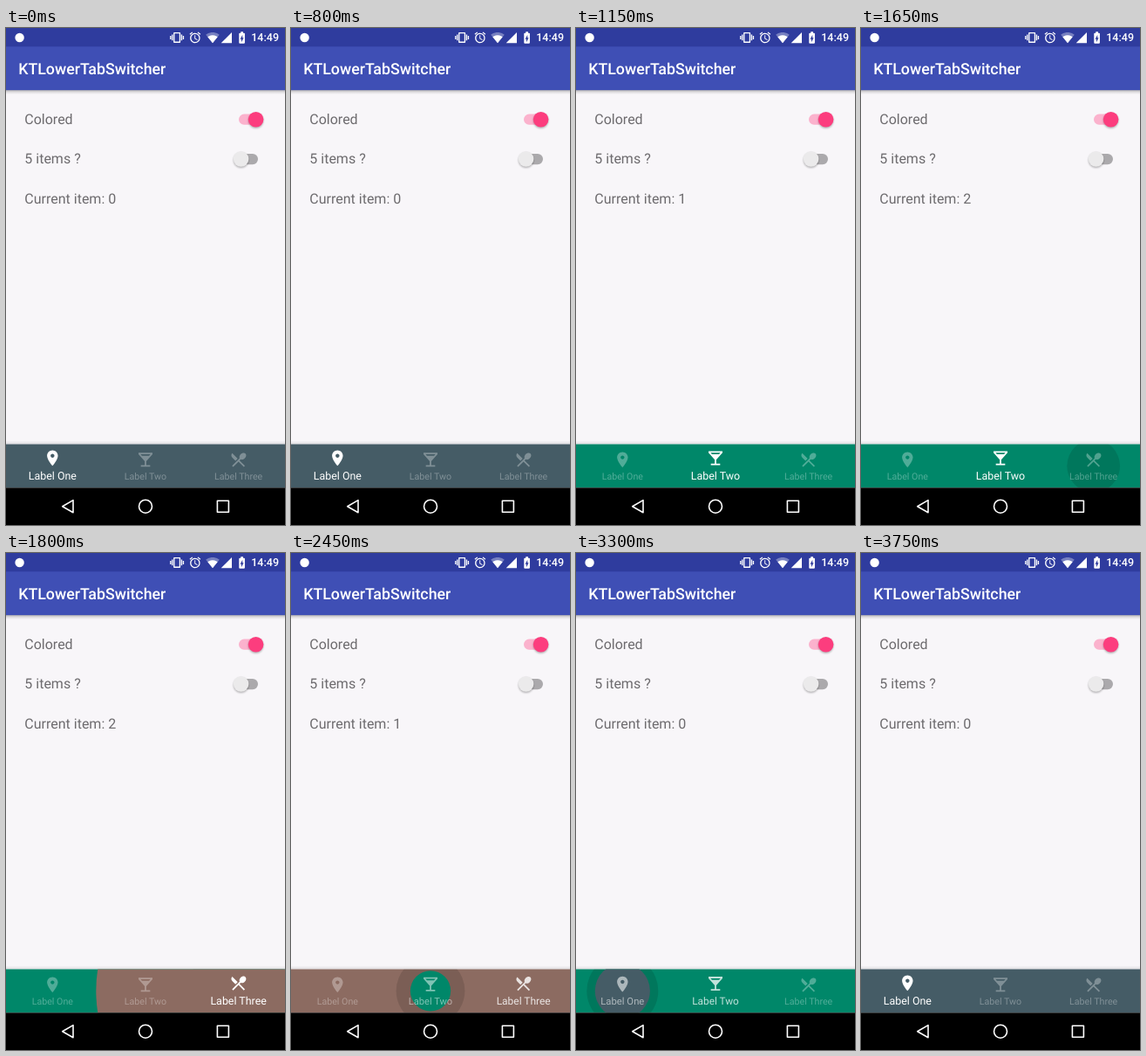
Animation, 320 px wide and 569 px high, one loop 3.9 s. Source, as an HTML page:

```html
<!DOCTYPE html>
<html lang="en">
<head>
<meta charset="utf-8">
<title>Bottom navigation</title>
<style>
  html, body { margin: 0; width: 100%; height: 100%; overflow: hidden; background: #000; }
  svg { display: block; width: 100%; height: 100%; }
  text { font-family: Roboto, "Open Sans", sans-serif; text-rendering: geometricPrecision; }
  .body { font-size: 16px; fill: #6d6b6e; }
</style>
</head>
<body>
<svg viewBox="0 0 320 569">
  <defs>
    <linearGradient id="drop" x2="0" y2="1">
      <stop offset="0" stop-color="#000" stop-opacity=".32"/>
      <stop offset=".4" stop-color="#000" stop-opacity=".12"/>
      <stop offset="1" stop-color="#000" stop-opacity="0"/>
    </linearGradient>
    <linearGradient id="rise" x2="0" y2="1">
      <stop offset="0" stop-color="#000" stop-opacity="0"/>
      <stop offset="1" stop-color="#000" stop-opacity=".1"/>
    </linearGradient>
    <filter id="soft" x="-50%" y="-50%" width="200%" height="200%">
      <feGaussianBlur stdDeviation="1"/>
    </filter>
    <clipPath id="barClip"><rect y="476.4" width="320" height="49.9"/></clipPath>
  </defs>

  <rect width="320" height="569" fill="#f8f6f9"/>

  <!-- Header -->
  <rect y="71" width="320" height="5" fill="url(#drop)"/>
  <rect width="320" height="71.1" fill="#3f4fb5"/>
  <rect width="320" height="21.3" fill="#2f3c9e"/>
  <text x="14.2" y="53.2" font-size="17.8" font-weight="500" fill="#fff">KTLowerTabSwitcher</text>

  <!-- Status icons -->
  <g fill="#fff">
    <circle cx="15.6" cy="11" r="5.2"/>
    <path transform="translate(188.1 2.9) scale(.667)" fill-rule="evenodd" d="M0 15h2V9H0v6zm3 2h2V7H3v10zm19-8v6h2V9h-2zm-3 8h2V7h-2v10zM16.5 3h-9C6.67 3 6 3.67 6 4.5v15c0 .83.67 1.5 1.5 1.5h9c.83 0 1.5-.67 1.5-1.5v-15c0-.83-.67-1.5-1.5-1.5zM16 19H8V5h8v14z"/>
    <path transform="translate(209.2 3.2) scale(.64)" d="M22 5.72l-4.6-3.86-1.29 1.53 4.6 3.86L22 5.72zM7.88 3.39L6.6 1.86 2 5.71l1.29 1.53 4.59-3.85zM12.5 8H11v6l4.75 2.85.75-1.23-4-2.37V8zM12 4c-4.97 0-9 4.03-9 9s4.02 9 9 9a9 9 0 0 0 0-18zm0 16c-3.87 0-7-3.13-7-7s3.13-7 7-7 7 3.13 7 7-3.13 7-7 7z"/>
    <g transform="translate(229 3) scale(.667)">
      <path opacity=".35" d="M12 21.5L23.64 7c-.45-.34-4.93-4-11.64-4S.81 6.66.36 7z"/>
      <path d="M12 21.5l8.47-10.55C20.04 10.62 16.81 8 12 8s-8.04 2.62-8.47 2.95z"/>
    </g>
    <path d="M246.7 17.2h12.3V4.9z"/>
    <path transform="translate(262.6 3) scale(.667)" d="M15.67 4H14V2h-4v2H8.33C7.6 4 7 4.6 7 5.33v15.33C7 21.4 7.6 22 8.33 22h7.33c.74 0 1.34-.6 1.34-1.33V5.33C17 4.6 16.4 4 15.67 4zM11 20v-5.5H9L13 7v5.5h2L11 20z"/>
    <text x="313" y="15.4" font-size="12.5" font-weight="500" text-anchor="end">14:49</text>
  </g>

  <!-- Settings -->
  <text class="body" x="21.3" y="109.8">Colored</text>
  <text class="body" x="21.3" y="155.2">5 items ?</text>
  <text class="body" x="21.3" y="200.5" id="current">Current item: 0</text>

  <rect x="267" y="98.6" width="24" height="12.2" rx="6.1" fill="#fbb2cd"/>
  <circle cx="286.6" cy="106" r="8.7" opacity=".3" filter="url(#soft)"/>
  <circle cx="286.6" cy="104.7" r="8.8" fill="#fc3d7e"/>
  <rect x="265" y="144" width="24" height="12.2" rx="6.1" fill="#aba9ac"/>
  <circle cx="269.6" cy="151.3" r="8.7" opacity=".3" filter="url(#soft)"/>
  <circle cx="269.6" cy="150" r="8.8" fill="#ebeaeb"/>

  <!-- Tab bar -->
  <rect y="472.4" width="320" height="4" fill="url(#rise)"/>
  <g clip-path="url(#barClip)">
    <rect id="base" y="476" width="320" height="51"/>
    <circle id="ripple" cy="501.3" opacity=".12"/>
    <circle id="reveal" cy="501.3"/>
  </g>
  <g id="tabs" fill="#fff" text-anchor="middle"></g>

  <!-- System keys -->
  <rect y="526.3" width="320" height="42.7"/>
  <g fill="none" stroke="#fff" stroke-width="1.6" stroke-linejoin="round">
    <path d="M77 540.6v14.2l-12.3-7.1z"/>
    <circle cx="160" cy="547.7" r="7.5"/>
    <rect x="242.4" y="541.2" width="13" height="13"/>
  </g>
</svg>

<script>
const LOOP = 3900, REVEAL = 300, MORPH = 150;
const OFF_ALPHA = 0x50 / 255;

const tabs = [
  { label: 'Label One', color: '#455c66', icon: 'M12 2C8.13 2 5 5.13 5 9c0 5.25 7 13 7 13s7-7.75 7-13c0-3.87-3.13-7-7-7zm0 9.5c-1.38 0-2.5-1.12-2.5-2.5s1.12-2.5 2.5-2.5 2.5 1.12 2.5 2.5-1.12 2.5-2.5 2.5z' },
  { label: 'Label Two', color: '#008769', icon: 'M21 5V3H3v2l8 9v5H6v2h12v-2h-5v-5l8-9zM7.43 7L5.66 5h12.69l-1.78 2H7.43z' },
  { label: 'Label Three', color: '#8c6b61', icon: 'M8.1 13.34l2.83-2.83L3.91 3.5c-1.56 1.56-1.56 4.09 0 5.66l4.19 4.18zm6.78-1.81c1.53.71 3.68.21 5.27-1.38 1.91-1.91 2.28-4.65.81-6.12-1.46-1.46-4.2-1.1-6.12.81-1.59 1.59-2.09 3.74-1.38 5.27L3.7 19.87l1.41 1.41L12 14.41l6.88 6.88 1.41-1.41L13.41 13l1.47-1.47z' }
];

// Taps: time in ms, tab chosen
const taps = [[-1000, 0], [840, 1], [1649, 2], [2399, 1], [3240, 0]];

const byId = id => document.getElementById(id);
const set = (el, attrs) => { for (const k in attrs) el.setAttribute(k, attrs[k]); };
const add = (parent, name) =>
  parent.appendChild(document.createElementNS('http://www.w3.org/2000/svg', name));
const mix = (a, b, p) => a + (b - a) * p;
const ease = p => (1 - Math.cos(Math.PI * Math.min(1, Math.max(0, p)))) / 2;
const centre = i => 320 * (i + .5) / 3;

const current = byId('current'), base = byId('base');
const ripple = byId('ripple'), reveal = byId('reveal');

tabs.forEach((tab, i) => {
  tab.g = add(byId('tabs'), 'g');
  tab.path = add(tab.g, 'path');
  tab.text = add(tab.g, 'text');
  set(tab.path, { d: tab.icon });
  set(tab.text, { x: centre(i) });
  tab.text.textContent = tab.label;
});

function poseTab(tab, i, on) {
  set(tab.g, { opacity: mix(OFF_ALPHA, 1, on) });
  set(tab.path, { transform: `translate(${centre(i) - 10.67} ${mix(483.6, 481.8, on)}) scale(.889)` });
  set(tab.text, { y: mix(517, 516.6, on), 'font-size': mix(10.67, 12.44, on) });
}

function draw(t) {
  let n = taps.length - 1;
  while (taps[n][0] > t) n--;
  const [start, now] = taps[n];
  const before = n ? taps[n - 1][1] : now;
  const age = t - start, on = ease(age / MORPH);

  tabs.forEach((tab, i) =>
    poseTab(tab, i, i === now ? (now === before ? 1 : on) : i === before ? 1 - on : 0));
  current.textContent = 'Current item: ' + now;

  const done = age >= REVEAL;
  set(base, { fill: tabs[done ? now : before].color });
  set(ripple, { cx: centre(now), r: done ? 0 : 30 + age * .18 });
  set(reveal, { cx: centre(now), r: done ? 0 : 320 * ease(age / REVEAL), fill: tabs[now].color });
}

const begin = performance.now();
function tick() {
  draw((performance.now() - begin) % LOOP);
  requestAnimationFrame(tick);
}
tick();
</script>
</body>
</html>
```
